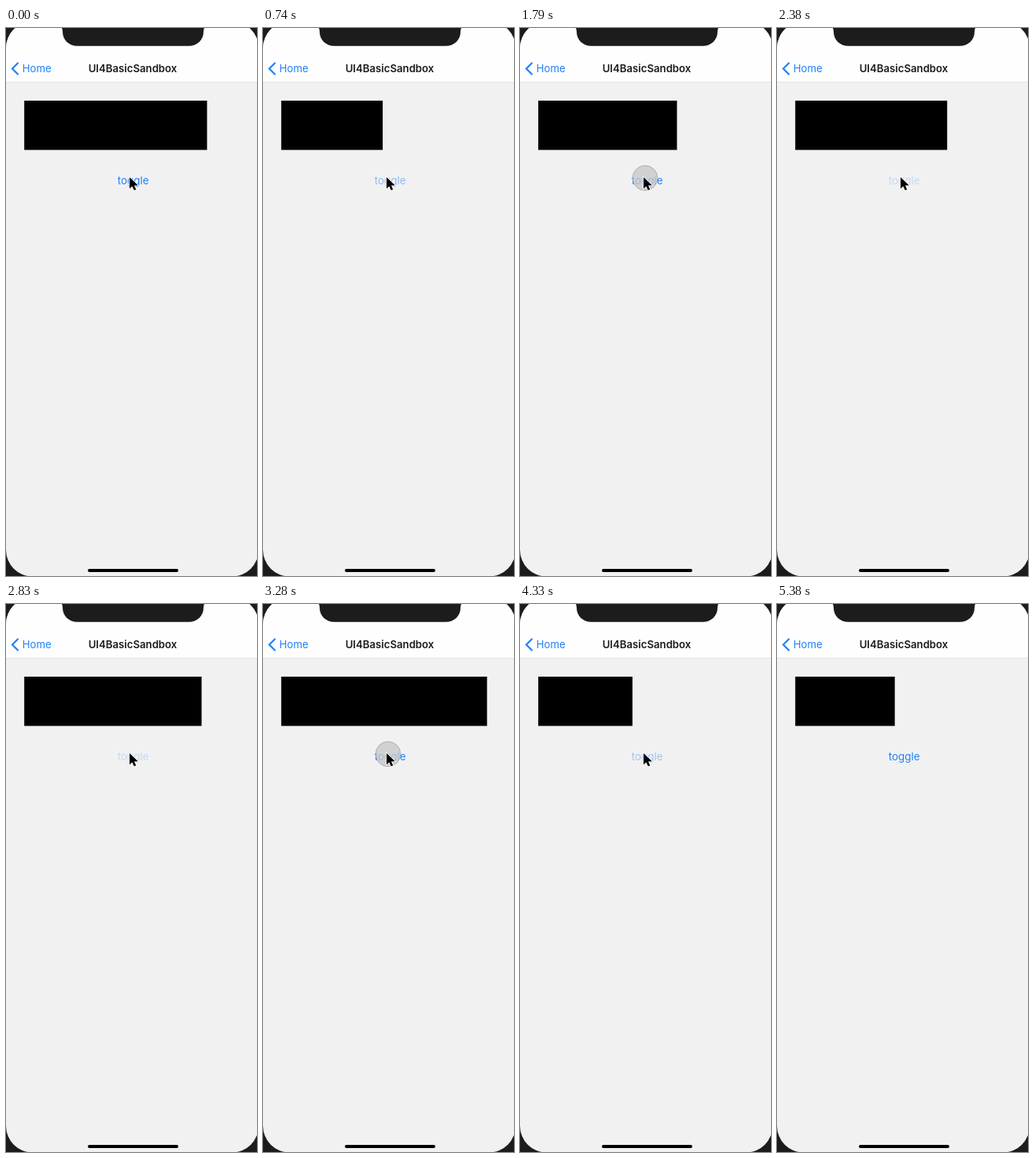
An HTML page for the animation above (5.78 s loop, 319 by 694 pixels).

```html
<!DOCTYPE html>
<html lang="en">
<head>
<meta charset="utf-8">
<title>Toggle width</title>
<style>
  html, body { margin: 0; width: 100%; height: 100%; overflow: hidden; background: #1c1c1c; }
  svg { display: block; width: 319px; height: 694px; }
  text { font: 13.2px Inter, "Open Sans", sans-serif; fill: #2281f7; }
  .title { font-weight: 600; fill: #1c1c1e; text-anchor: middle; }
  #label { font-size: 13.4px; text-anchor: middle; }
</style>
</head>
<body>
<svg viewBox="0 0 319 694">
  <clipPath id="screen"><rect y="-8" width="321" height="702.500" rx="33.500"/></clipPath>
  <g clip-path="url(#screen)">
    <rect width="321" height="694" fill="#f1f1f1"/>
    <rect width="321" height="68" fill="#fefefe"/>
    <rect y="68" width="321" height=".6" fill="#dcdcdc"/>
  </g>
  <path d="M71 0Q72 2 72 5C72 15 80 22.800 91 22.800H232C243 22.800 251 15 251 5Q251 2 252 0Z" fill="#1c1c1c"/>
  <path d="M15 44.500L8 51.500L15 58.500" fill="none" stroke="#2281f7" stroke-width="2.200" stroke-linecap="round"/>
  <text x="20.700" y="56.400">Home</text>
  <text class="title" x="161" y="56.400">UI4BasicSandbox</text>
  <rect id="bar" x="23.200" y="92" height="62.400"/>
  <text id="label" x="161.700" y="197.500">toggle</text>
  <circle id="touch" cx="159" cy="190" r="15.800" fill="#c8c8c8" fill-opacity=".78" stroke="#a2a2a2" stroke-width=".8"/>
  <rect x="104" y="685" width="115" height="4" rx="2"/>
  <path id="cursor" d="M0 0V14.500L3.400 11.500L5.800 16.500L8.300 15.400L6 10.600L10.800 10.300Z" stroke="#fff" stroke-width="1.600" paint-order="stroke"/>
</svg>
<script>
const LOOP = 5780, STEP = 150;
const LEFT = 23.2, START = 255.5;
const HOLD = 100, MOVE = 500, DIM = 115, FADE = 250;
// release time and the right edge the bar then glides to
const taps = [
  [520, 124.5], [1130, 199.5], [1860, 201], [2243, 247.5],
  [2770, 284.7], [3340, 124.5], [4130, 149.7]
];
const LEAVE = 4362, TRAVEL = 417, GONE = 5380;

const $ = id => document.getElementById(id);
const clamp = v => Math.min(1, Math.max(0, v));
const inOut = (p, n) => p < .5 ? (2 * p) ** n / 2 : 1 - (2 - 2 * p) ** n / 2;
const show = (id, on) => $(id).setAttribute('visibility', on ? 'visible' : 'hidden');

// cubic-bezier(.5, .01, 0, 1)
function glide(p) {
  const curve = (s, a, b) => 3 * (1 - s) ** 2 * s * a + 3 * (1 - s) * s * s * b + s ** 3;
  let lo = 0, hi = 1;
  for (let i = 0; i < 24; i++) {
    const mid = (lo + hi) / 2;
    if (curve(mid, .5, 0) < p) lo = mid; else hi = mid;
  }
  return curve(hi, .01, 1);
}

function held(t) {
  const base = t < 740 ? 0 : t < 1930 ? 740 : 1930;
  return base + Math.floor((t - base) / STEP) * STEP;
}

function draw(t) {
  let edge = START, opacity = 1;
  for (const [up, target] of taps) {
    if (t < up) break;
    edge += (target - edge) * glide(clamp((t - up) / MOVE));
    opacity = .2 + .8 * inOut(clamp((t - up - DIM) / FADE), 2);
  }
  $('bar').setAttribute('width', edge - LEFT);
  $('label').setAttribute('opacity', opacity);
  show('touch', taps.some(([up]) => t >= up - HOLD && t < up));

  // the pointer sweeps to the lower right corner, then drifts out below
  const sweep = inOut(clamp((t - LEAVE) / TRAVEL), 3);
  const drift = Math.max(0, t - LEAVE - TRAVEL) * .036;
  $('cursor').setAttribute('transform',
    `translate(${157 + 143 * sweep - drift} ${189 + 475 * sweep + drift})`);
  show('cursor', t < GONE);
}

const begin = performance.now();
function tick() {
  draw(held((performance.now() - begin) % LOOP));
  requestAnimationFrame(tick);
}
tick();
</script>
</body>
</html>
```
